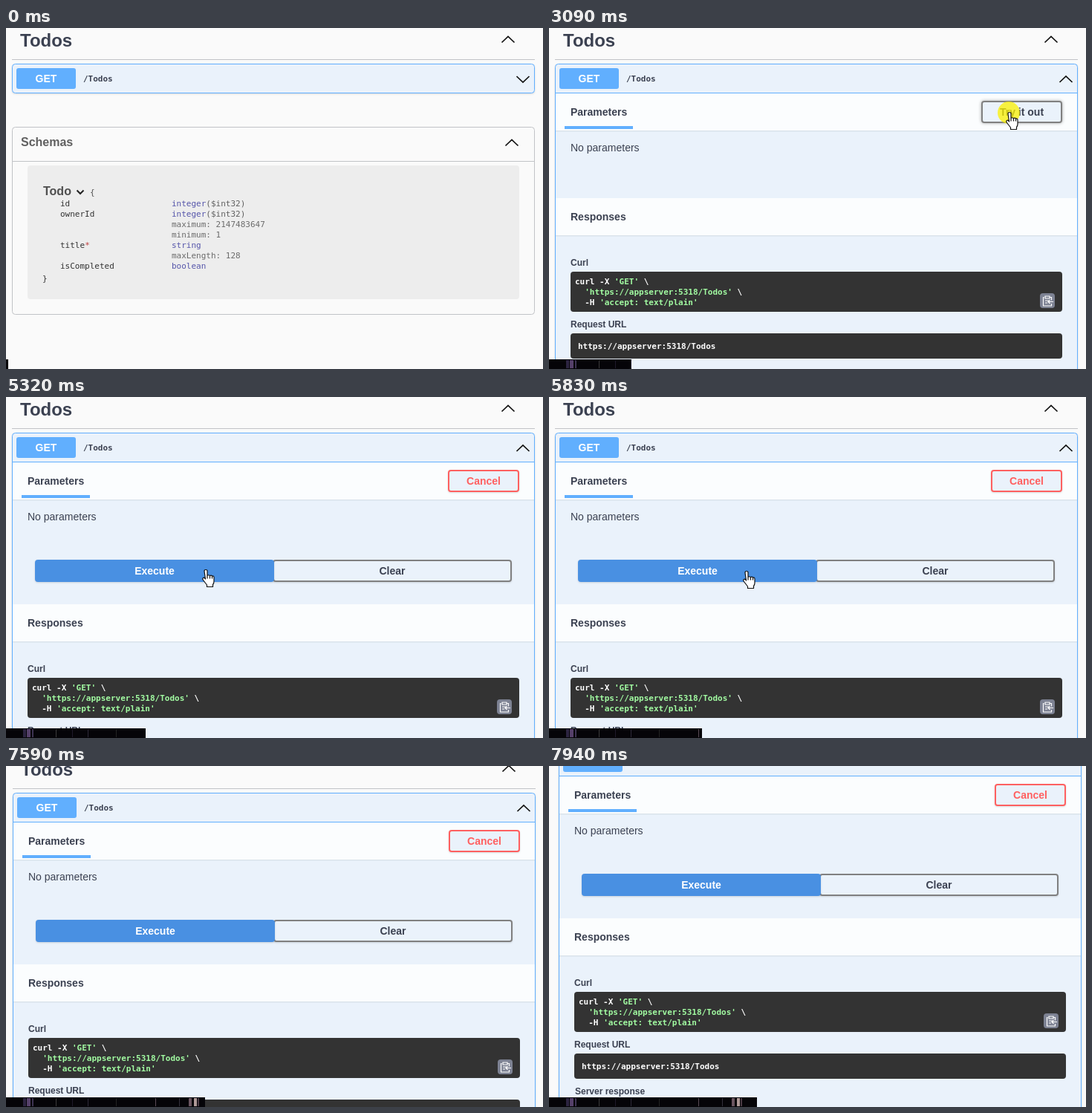
An HTML page that plays this animation: 723 px wide and 459 px high, repeating every 8 s.

```html
<!DOCTYPE html>
<html lang="en">
<head>
<meta charset="utf-8">
<title>API page demo</title>
<style>
  html, body { margin: 0; width: 100%; height: 100%; overflow: hidden; background: #fafafa; }
  svg { display: block; font-family: "Liberation Sans", Arial, sans-serif; fill: #3b4151; }
  text { white-space: pre; }
  .bold { font-weight: bold; }
  .mono { font: 11px "DejaVu Sans Mono", monospace; }
  .mono.bold { font-weight: bold; }
  .chevron { fill: none; stroke: #111; stroke-width: 1.7; }
  .soft { filter: drop-shadow(0 1px 1px rgba(0,0,0,.13)); }
  .hover { filter: drop-shadow(0 0 2px rgba(0,0,0,.35)); }
</style>
</head>
<body>
<svg id="stage" width="723" height="459" viewBox="0 0 723 459"></svg>
<script>
const LOOP = 8000;
const stage = document.getElementById('stage');
const URL_TEXT = 'https://appserver:5318/Todos';
const TINT = '#eaf2fb', BLUE = '#61affe', LINE = '#c1c3c7', GREEN = '#a2fca2';

const text = (x, y, size, content, attrs = 'class="bold"') =>
  `<text x="${x}" y="${y}" font-size="${size}" ${attrs}>${content}</text>`;
const mono = (x, y, content, fill, attrs = '') =>
  `<text class="mono" x="${x}" y="${y}" fill="${fill}" ${attrs}>${content}</text>`;
const code = (x, y, content) => `<text class="mono bold" x="${x}" y="${y}" fill="#fff">${content}</text>`;
const green = s => `<tspan fill="${GREEN}">${s}</tspan>`;
const rect = (x, y, w, h, fill, r = 0, attrs = '') =>
  `<rect x="${x}" y="${y}" width="${w}" height="${h}" rx="${r}" fill="${fill}" ${attrs}/>`;
const group = (id, content) => `<g id="${id}">${content}</g>`;
const chevron = (x, y, dir) => `<path class="chevron" d="M${x} ${y + 4 * dir}l8.5 ${-8 * dir}l8.5 ${8 * dir}"/>`;
const centered = 'class="bold" text-anchor="middle"';
const button = (x, y, w, label, color, ink, cls = 'soft') =>
  rect(x + 1, y + 1, w - 2, 28, TINT, 3, `stroke="${color}" stroke-width="2" class="${cls}"`) +
  text(x + w / 2, y + 20, 14, label, `${centered} fill="${ink}"`);
const band = y => rect(9, y, 702, 50, '#fbfdfe') + rect(9, y + 50, 702, 1, '#d9e2ea') + rect(9, y + 51, 702, 1, '#e3ecf4');

const cardFrame = height =>
  rect(8.5, 48.5, 703, height, TINT, 4, `stroke="${BLUE}" class="soft"`);

const schemaRow = (y, name, type) => mono(73, y, name, '#333') + mono(223, y, type, '#606060');
const blue = s => `<tspan fill="#5555aa">${s}</tspan>`;
const note = (y, s) => mono(223, y, s, '#6b6b6b', 'font-style="italic"');

const collapsed = cardFrame(39) + chevron(687.5, 69, -1) +
  rect(8.5, 133.5, 703, 252, 'none', 4, `stroke="${LINE}"`) + rect(9, 179, 702, 1, LINE) +
  text(20, 159, 16, 'Schemas', 'class="bold" fill="#606060"') + chevron(672.5, 154.5, 1) +
  rect(29, 185, 662, 180, '#ededed', 4) +
  text(50, 225, 16, 'Todo', 'class="bold" fill="#505050"') +
  '<path d="M95.5 218.5l4.5 4.5l4.5-4.5" fill="none" stroke="#222" stroke-width="2"/>' +
  mono(113, 225, '{', '#505050') + mono(49, 341, '}', '#333') +
  schemaRow(240, 'id', blue('integer') + '($int32)') +
  schemaRow(254, 'ownerId', blue('integer') + '($int32)') +
  note(268, 'maximum: 2147483647') + note(282, 'minimum: 1') +
  schemaRow(296, 'title<tspan fill="#c04040">*</tspan>', blue('string')) +
  note(310, 'maxLength: 128') +
  schemaRow(324, 'isCompleted', blue('boolean'));

const copyIcon = rect(661, 357, 20, 20, '#7d8293', 4) +
  '<path d="M674 362.5h2.5v4M666.500 362.500h-1v11.500h11v-3M668 361h6v3h-6zM668 367h5M668 370h3M679 368.500h-7m2.500-2.500l-2.500 2.500l2.500 2.500" fill="none" stroke="#fff" stroke-width="1.200"/>';

const responses = band(229) + text(29, 259, 14, 'Responses') +
  text(29, 320, 12, 'Curl') + rect(29, 328, 662, 54, '#333', 4) +
  code(35, 345, `curl -X ${green("'GET'")} \\`) +
  code(35, 359, `  ${green(`'${URL_TEXT}'`)} \\`) +
  code(35, 373, `  -H ${green("'accept: text/plain'")}`) + copyIcon +
  text(29, 403, 12, 'Request URL') + rect(29, 411, 662, 34, '#333', 4) + code(39, 432, URL_TEXT) +
  text(30, 466, 12, 'Server response');

const spinner =
  '<circle cx="360" cy="323" r="29" fill="none" stroke="#dde4ec" stroke-width="2"/>' +
  '<path id="arc" d="M339.5 302.5a29 29 0 0 1 41 0" fill="none" stroke="#666" stroke-width="2"/>' +
  text(360, 326, 10, 'LOADING', centered);

const expanded = cardFrame(700) + rect(9, 87, 702, 1, BLUE) + chevron(687.5, 69, 1) + band(88) +
  text(29, 118, 14, 'Parameters') + rect(21, 132, 92, 4, BLUE) +
  text(29, 166, 14, 'No parameters', '') +
  group('tryButton', button(582, 98, 109, 'Try it out', '#808080', '#3b4151', 'hover')) +
  group('actions',
    button(595, 98, 96, 'Cancel', '#ff6060', '#ff6060') +
    button(359, 219, 322, 'Clear', '#808080', '#3b4151') +
    rect(39, 219, 322, 30, '#4990e2', 4, 'class="soft"') +
    text(200, 239, 14, 'Execute', `${centered} fill="#fff"`)) +
  group('spinner', spinner) + group('responses', responses);

// Thin marks on the progress strip: x, width, colour
const marks = [[23, 4, '#2c2440'], [28, 5, '#55406a'], [35, 2, '#3c3350'], [67, 1, '#3a3a3a'],
  [89, 1, '#1f1a2a'], [110, 1, '#2d2838'], [148, 1, '#222'], [201, 1, '#5a4a55'],
  [233, 1, '#33303c'], [246, 4, '#6a5560'], [253, 4, '#b09a98'], [258, 2, '#4a3a44']];

stage.innerHTML =
  group('page',
    text(19, 25, 24, 'Todos') + chevron(667.5, 15.5, 1) + rect(8, 42, 704, 1, LINE) +
    group('collapsed', collapsed) + group('expanded', expanded) +
    group('focus', rect(14, 54, 692, 28, 'none', 3, 'stroke="#2a2d33" stroke-width="2"')) +
    rect(14, 54, 80, 28, BLUE, 3) + text(54, 73, 14, 'GET', `${centered} fill="#fff"`) +
    mono(104, 72, '/Todos', '#3b4151', 'style="font-weight:bold"')) +
  group('cursor',
    '<circle id="click" cx="-1" cy="0" r="15" fill="#fbf000" opacity=".75"/>' +
    `<g fill="#fff" stroke="#111" stroke-width="1.200" stroke-linejoin="round">
      <path id="hand" d="M-2 1.500q0-2 2-2t2 2v6q1.500-1.500 3.500 0q2-1 3 .500q2.500-.500 2.500 2v5q0 3-1.500 4.500v3h-8v-2.500l-5-6.500q-1.500-2 0-3t3 1.500zM2 7.500v4M5.500 8v3.500M8.500 8.500v3"/>
      <path id="arrow" d="M0 0v16l3.700-3.500l2.600 6l2.700-1.200l-2.600-5.800h5.200z"/>
    </g>`) +
  `<clipPath id="strip">${rect(0, 446, 0, 13, '#000', 0, 'id="played"')}</clipPath>` +
  `<g clip-path="url(#strip)">${rect(0, 446, 723, 13, '#050408')}` +
  marks.map(([x, w, c]) => rect(x, 447, w, 11, c)).join('') + '</g>';

const $ = id => document.getElementById(id);
const show = (id, on) => $(id).setAttribute('display', on ? 'inline' : 'none');
const move = (id, x, y) => $(id).setAttribute('transform', `translate(${x} ${y})`);
const within = (t, spans) => spans.some(([from, to]) => t >= from && t < to);

const OPEN = 1910, TRY = 3165, PAN = 7354;
const clicks = [[1690, 1800], [3040, 3165], [4950, 5060], [5900, 6010]];
const loads = [[5070, 5210], [6020, 6160]];
// Cursor stops: time, x, y
const stops = [[80, 640, 480], [700, 672, 156], [950, 672, 152], [1450, 693, 62], [1650, 694, 71],
  [2450, 694, 71], [2950, 620, 114], [3350, 620, 114], [4050, 272, 231], [5000, 272, 231],
  [5700, 266, 235], [6680, 266, 235], [7200, 264, -30]];

function cursorAt(t) {
  const i = stops.findIndex(s => s[0] > t);
  if (i < 1) return i ? stops.at(-1).slice(1) : stops[0].slice(1);
  const [t0, x0, y0] = stops[i - 1], [t1, x1, y1] = stops[i];
  const p = (t - t0) / (t1 - t0), e = p * p * (3 - 2 * p);
  return [x0 + (x1 - x0) * e, y0 + (y1 - y0) * e];
}

function overButton(t, x, y) {
  if (y < 88) return true;
  if (t < OPEN) return y > 133 && y < 180;
  if (y > 98 && y < 128) return x > (t < TRY ? 582 : 595);
  return t >= TRY && y > 219 && y < 249;
}

function draw(t) {
  const loading = within(t, loads), tried = t >= TRY;
  show('collapsed', t < OPEN);
  show('expanded', t >= OPEN);
  show('focus', t >= 1700 && t < 3040);
  show('tryButton', !tried);
  show('actions', tried);
  show('spinner', loading);
  $('arc').setAttribute('transform', `rotate(${t * .36} 360 323)`);
  move('responses', 0, (tried ? 50 : 0) + (loading ? 100 : 0));

  const rise = 74 * (Math.max(0, t - PAN) / 586) ** 2;
  move('page', Math.round(rise * 5 / 74), -Math.round(rise));

  const [x, y] = cursorAt(t), hand = overButton(t, x, y);
  move('cursor', Math.round(x), Math.round(y));
  show('hand', hand);
  show('arrow', !hand);
  show('click', within(t, clicks));
  $('played').setAttribute('width', Math.round(2.7 + t * .0349));
}

function tick(now) {
  draw(now % LOOP);
  requestAnimationFrame(tick);
}
draw(0);
requestAnimationFrame(tick);
</script>
</body>
</html>
```
